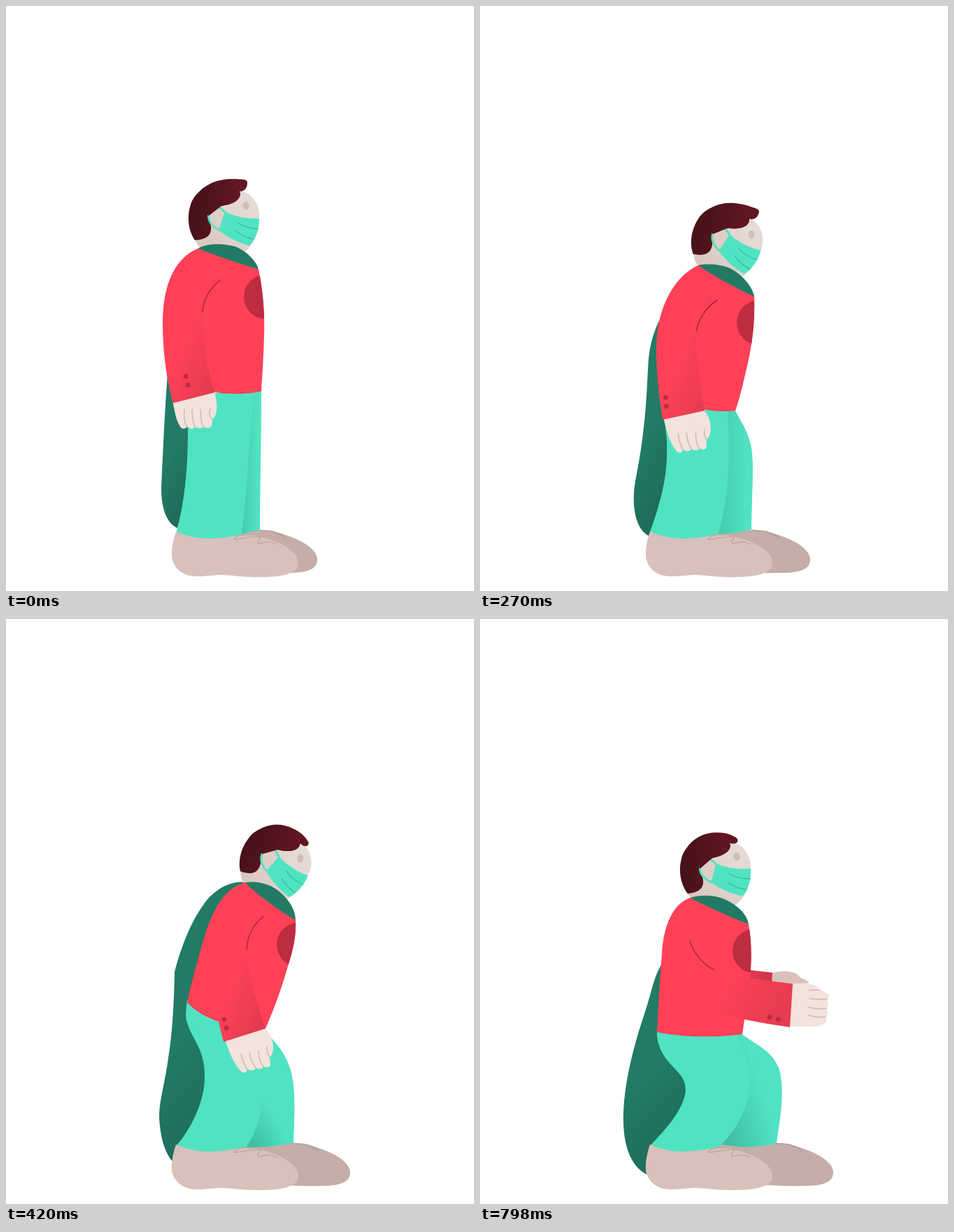
Animation of 669x837 px, one loop 870 ms. Source, as an HTML page without scripts:

```html
<!DOCTYPE html>
<html lang="en">
<head>
<meta charset="utf-8">
<title>Kneeling hero</title>
<style>
  html, body { margin: 0; width: 100%; height: 100%; overflow: hidden; background: #fff; }
  svg { display: block; width: 100%; height: 100%; }

  .cape { fill: url(#capeFill); }
  .collar { fill: #217a64; }
  .hair { fill: url(#hairFill); }
  .leg { fill: #50e3c2; }
  .back-leg { fill: url(#legSide); }
  .back-leg.bent { fill: url(#legBent); }
  .torso { fill: #ff4158; }
  .arm { fill: url(#armDown); }
  .arm.out { fill: url(#armOut); }
  .far-arm { fill: url(#farArm); }
  .badge, .dot { fill: #bd2c41; }
  .hand { fill: #f2e3dc; }
  .far-hand { fill: #d8c1ba; }
  .crease, .fold, .lace { fill: none; stroke-linecap: round; }
  .crease { stroke: #a5283a; stroke-width: 1.5; }
  .fold { stroke: #cfb9b1; stroke-width: 1.5; }
  .lace { stroke: #bfa8a1; stroke-width: 1.5; }

  /* Poses hold, then cut: 120, 150, 150, 150, 120, 180 ms */
  .pose { visibility: hidden; animation: 870ms step-end infinite; }
  #stand { animation-name: stand; }
  #dip { animation-name: dip; }
  #lean { animation-name: lean; }
  #bend { animation-name: bend; }
  #reach { animation-name: reach; }
  #kneel { animation-name: kneel; }
  @keyframes stand { 0% { visibility: visible } 13.793%, 100% { visibility: hidden } }
  @keyframes dip { 0% { visibility: hidden } 13.793% { visibility: visible } 31.034%, 100% { visibility: hidden } }
  @keyframes lean { 0% { visibility: hidden } 31.034% { visibility: visible } 48.276%, 100% { visibility: hidden } }
  @keyframes bend { 0% { visibility: hidden } 48.276% { visibility: visible } 65.517%, 100% { visibility: hidden } }
  @keyframes reach { 0% { visibility: hidden } 65.517% { visibility: visible } 79.31%, 100% { visibility: hidden } }
  @keyframes kneel { 0% { visibility: hidden } 79.31%, 100% { visibility: visible } }
</style>
</head>
<body>
<svg viewBox="0 0 669 837">
  <defs>
    <linearGradient id="capeFill" x1=".3" y1="0" x2=".6" y2="1">
      <stop offset=".5" stop-color="#217b65"/><stop offset="1" stop-color="#1e6a58"/>
    </linearGradient>
    <linearGradient id="hairFill">
      <stop offset=".1" stop-color="#47121a"/><stop offset=".8" stop-color="#611620"/>
    </linearGradient>
    <linearGradient id="skinFill" x1=".2" y1=".9" x2=".8" y2=".3">
      <stop offset="0" stop-color="#d9c7c0"/><stop offset="1" stop-color="#e5dad5"/>
    </linearGradient>
    <linearGradient id="legSide">
      <stop offset="0" stop-color="#44c9ab"/><stop offset=".85" stop-color="#50e3c2"/>
    </linearGradient>
    <linearGradient id="legBent" x1=".1" y1=".8" x2=".75" y2=".45">
      <stop offset="0" stop-color="#40bfa3"/><stop offset=".9" stop-color="#50e3c2"/>
    </linearGradient>
    <linearGradient id="armDown" x1=".4" y1=".55" x2=".85" y2="1">
      <stop offset="0" stop-color="#ff4158"/><stop offset="1" stop-color="#e03a50"/>
    </linearGradient>
    <linearGradient id="armOut" x1=".1" y1=".3" x2=".9" y2=".6">
      <stop offset="0" stop-color="#ff4158"/><stop offset="1" stop-color="#e63c51"/>
    </linearGradient>
    <linearGradient id="farArm">
      <stop offset="0" stop-color="#e33b50"/><stop offset="1" stop-color="#c93449"/>
    </linearGradient>

    <!-- Head parts, with the eye at 0,0 -->
    <g id="face" transform="translate(-343 -286)">
      <path fill="url(#skinFill)" d="M270 334C274 345 283 352 300 362L335 356C352 347 362 325 362 298C361 280 350 267 334 264L290 300Z"/>
      <path class="hair" d="M270 335C258 318 257 288 272 270L320 266H334C337 273 331 283 308 286L290 300L293 316C294 328 287 334 270 335Z"/>
      <path fill="#dfcfc8" stroke="#50e3c2" stroke-width="3" d="M313 295C306 287 301 286 297 288C285 297 287 312 306 321"/>
      <path fill="#dfcfc8" d="M312 295L305 320L300 316Z"/>
      <path fill="#50e3c2" d="M313 294C330 303 350 305 362 304C362 319 357 335 348 343C330 338 312 329 302 318L305 318Z"/>
      <path fill="none" stroke="#30ad91" d="M330 309Q341 318 361 319M328 322Q340 331 354 334"/>
      <ellipse cx="343" cy="286" rx="4.6" ry="6" fill="#d1beb7" transform="rotate(-14 343 286)"/>
    </g>
    <g id="head">
      <use href="#face"/>
      <path class="hair" transform="translate(-343 -286)" d="M264 284C266 278 268 275 272 270C288 251 310 246 334 248C342 248 345 249 345 253C345 261 340 266 334 265C337 273 331 283 308 286L290 300Z"/>
    </g>
    <g id="bowedHead">
      <use href="#face"/>
      <path class="hair" transform="translate(-343 -286)" d="M264 284C266 278 268 275 272 270C284 254 302 249 316 250C329 250 339 255 345 260C348 266 342 269 334 266C337 273 331 283 308 286L290 300Z"/>
    </g>

    <g id="farShoe">
      <path fill="#c4aea7" d="M270 748L345 750C362 749 385 750 400 757C422 764 445 777 445 792C445 806 430 811 405 811C380 812 350 810 330 808Z"/>
      <path class="lace" style="stroke: #b29d96" d="M362 750C375 752 384 750 387 755C392 755 396 757 400 762"/>
    </g>

    <g id="lowHand">
      <path class="hand" d="M259 586C265 605 272 622 280 630C285 636 290 635 291 629C296 632 302 631 303 627C307 630 313 629 314 625C320 628 324 626 324 622L323 612C331 605 330 585 316 570Z"/>
      <path class="fold" d="M282 607C284 618 288 625 291 630M294 605C295 614 299 622 303 627M307 603C307 613 310 620 314 626M319 597C318 605 321 609 323 612"/>
    </g>

    <g id="dots"><circle class="dot" r="3.5"/><circle class="dot" r="3.5" cx="3" cy="12.3"/></g>
    <circle id="badge" class="badge" r="32"/>
  </defs>

  <g id="stand" class="pose">
    <path class="cape" d="M231 525C227 580 224 640 222 690C222 720 230 740 245 747L262 690V600L240 560Z"/>
    <use href="#farShoe"/>
    <path class="back-leg" d="M345 550H365C365 620 363 700 363 749L335 756Z"/>
    <path class="leg" d="M258 556L355 550C347 620 345 690 337 758L292 765L243 755C258 700 260 650 260 600Z"/>
    <use href="#head" transform="translate(343 286)"/>
    <path id="standBody" class="torso" d="M274 347L361 377C368 410 370 445 369 470C368 510 366 530 365 551C345 556 315 556 297 552L260 440Z"/>
    <clipPath id="standClip"><use href="#standBody"/></clipPath>
    <g clip-path="url(#standClip)"><use href="#badge" x="372" y="416"/></g>
    <path class="hand" d="M238 564C241 580 243 592 248 600C251 606 256 606 259 602C264 606 268 606 270 602C274 605 280 605 282 602C288 605 293 604 294 600L295 591C303 585 303 570 298 552Z"/>
    <path class="fold" d="M255 577C254 588 255 597 259 602M266 577C266 588 267 596 270 602M278 577C278 588 279 596 282 602M292 576C290 584 292 589 295 591"/>
    <path class="arm" d="M274 347C240 362 224 400 224 455C224 500 231 540 239 568L298 553C288 520 280 480 281 438C285 420 295 405 307 392Z"/>
    <path class="crease" d="M307 392C293 402 283 418 280.500 438"/>
    <path class="collar" d="M274 347C290 338 315 340 330 345C345 352 358 365 361 377C335 369 300 357 274 347Z"/>
    <use href="#dots" x="257" y="530"/>
  </g>

  <g id="dip" class="pose">
    <path class="cape" d="M239 455C231 480 231 520 231 560C231 600 228 640 222 675C216 705 222 737 245 747L262 690V590L250 500Z"/>
    <use href="#farShoe" x="13"/>
    <path class="back-leg" d="M345 570L366 573C377 592 377 605 376 625C374 680 374 710 374 749L337 756Z"/>
    <path class="leg" d="M258 570H352C354 650 352 700 339 758L292 765L243 755C259 700 260 650 260 588Z"/>
    <use href="#head" transform="translate(358 313) rotate(9.700)"/>
    <path id="dipBody" class="torso" d="M286 365L371 402C376 430 376 455 375 472C372 520 368 555 366 573C350 578 330 577 316 575L270 460Z"/>
    <clipPath id="dipClip"><use href="#dipBody"/></clipPath>
    <g clip-path="url(#dipClip)"><use href="#badge" x="380" y="439"/></g>
    <use href="#lowHand"/>
    <path class="arm" d="M286 365C255 378 238 420 238 465C239 510 248 550 259 589L318 572C305 535 298 500 295 458C295 440 303 425 319 411Z"/>
    <path class="crease" d="M319 411C303 424 295 440 294.500 458"/>
    <path class="collar" d="M286 365C300 358 322 360 335 365C352 372 367 388 371 402C343 392 312 379 286 365Z"/>
    <use href="#dots" x="258.500" y="560"/>
  </g>

  <g id="lean" class="pose">
    <path class="cape" d="M256 450C240 485 241 505 239 540C236 600 230 640 222 680C216 715 222 748 241 758L270 700V600L258 560Z"/>
    <use href="#farShoe" x="27"/>
    <path class="back-leg" d="M345 575L365 579C378 605 390 615 390 660C390 690 388 720 388 749Q360 756 338 756Z"/>
    <path class="leg" d="M262 575H354C357 650 357 700 340 758L292 765L242 755C266 690 268 660 267 620Z"/>
    <use href="#head" transform="translate(388 327) rotate(15.500)"/>
    <path id="leanBody" class="torso" d="M312 371L392 415C393 450 390 480 382 515C375 545 370 565 365 579C350 581 335 580 320 577L290 470Z"/>
    <clipPath id="leanClip"><use href="#leanBody"/></clipPath>
    <g clip-path="url(#leanClip)"><use href="#badge" x="399" y="453"/></g>
    <use href="#lowHand" transform="translate(3 3) rotate(5 260 588)"/>
    <path class="arm" d="M312 371C280 385 252 430 252 490C252 530 257 565 261 592L321 579C314 545 309 505 310 465C312 450 320 433 339 421Z"/>
    <path class="crease" d="M339 421C322 432 312 449 309.500 465"/>
    <path class="collar" d="M312 371C325 368 345 370 357 375C375 384 390 402 392 416C365 403 335 387 312 371Z"/>
    <use href="#dots" transform="translate(265.500 560) rotate(9)"/>
  </g>

  <g id="bend" class="pose">
    <path class="cape" d="M343 377C325 373 300 385 285 405C262 435 247 480 241 505C240 560 237 600 231 635C225 675 216 700 220 725C222 748 230 768 238 776L290 700L300 500Z"/>
    <use href="#farShoe" x="47"/>
    <path class="leg" d="M259 545C257 560 256 570 259 578C268 605 284 615 284 655C284 690 265 730 242 755L292 765L343 757L411 749C411 730 413 710 412 680C410 640 400 620 372 592L340 560Z"/>
    <path class="back-leg bent" d="M365 690C364 720 354 740 343 756Q385 756 411 749C411 730 413 710 412 690Z"/>
    <use href="#bowedHead" transform="translate(421 343) rotate(22)"/>
    <path id="bendBody" class="torso" d="M342 377C310 385 295 420 285 450C270 500 263 530 259 549C270 560 285 570 304 576L371 586C380 565 392 535 402 500C410 475 415 455 414 431Z"/>
    <clipPath id="bendClip"><use href="#bendBody"/></clipPath>
    <g clip-path="url(#bendClip)"><use href="#badge" x="419" y="466"/></g>
    <use href="#lowHand" x="54" y="15"/>
    <path class="arm" d="M320 400L368 426C352 438 345 455 344 473C347 510 358 550 371 586L311 605C305 580 298 555 293 525Z"/>
    <path class="crease" d="M368 426C353 437 345 454 344 473"/>
    <path class="collar" d="M342 377C360 374 380 380 392 391C405 402 414 417 414 431C388 415 362 397 342 377Z"/>
    <use href="#dots" x="312" y="573"/>
  </g>

  <g id="reach" class="pose">
    <path class="cape" d="M357 381C340 380 322 390 308 409C293 429 284 452 272 475C262 490 256 495 250 512C243 528 240 540 238 560C234 600 231 640 223 680C217 705 218 745 238 790L310 680L290 500Z"/>
    <use href="#farShoe" x="60"/>
    <path class="back-leg bent" d="M350 575L390 590L415 632C428 660 430 685 429 700C428 720 425 740 424 750Q395 757 368 755L338 751Z"/>
    <path class="leg" d="M260 560C250 590 250 610 265 627C285 648 302 655 302 677C302 700 275 725 242 755L292 765L343 758C365 735 374 705 374 670C374 640 368 615 360 590Z"/>
    <use href="#bowedHead" transform="translate(439 352) rotate(26.600)"/>
    <path class="far-hand" d="M450 544C470 548 480 560 478 570C484 580 485 588 482 590C478 593 474 591 473 592L474 598L452 584L431 570Z"/>
    <path class="far-arm" d="M409 502L452 544L431 570L395 542Z"/>
    <path id="reachBody" class="torso" d="M355 381C335 383 318 405 305 430C290 460 282 490 275 507L272 520C268 540 262 553 260 562C295 583 330 592 371 596L398 540C404 525 409 515 411 507C418 485 426 465 426 438Z"/>
    <clipPath id="reachClip"><use href="#reachBody"/></clipPath>
    <g clip-path="url(#reachClip)"><use href="#badge" x="430" y="475"/></g>
    <path class="hand" d="M448 585C458 583 468 586 474 594C479 600 480 606 480 610C484 616 488 624 486 627C482 630 478 628 476 628C477 634 478 640 474 642C470 644 466 642 466 643C466 650 464 655 460 655C445 652 430 645 414 631Z"/>
    <path class="fold" d="M459 612Q466 622 476 627M451 626Q461 634 473 642M443 635Q452 644 465 646"/>
    <path class="arm out" d="M366 505C378 522 390 532 400 541L450 584L414 634L370 596L358 545Z"/>
    <path class="crease" d="M359 454C355 475 358 490 366 505"/>
    <path class="collar" d="M355 381C373 380 390 387 402 397C416 407 427 424 426 438C400 420 377 402 355 381Z"/>
    <use href="#dots" transform="translate(396.500 609) rotate(-30)"/>
  </g>

  <g id="kneel" class="pose">
    <path class="cape" d="M259 495C248 513 245 535 236 562C222 603 210 648 206 690C202 735 208 780 239 795L300 680L262 590Z"/>
    <use href="#farShoe" x="60"/>
    <path class="back-leg bent" d="M355 585L375 594C395 610 418 617 428 645C437 680 427 725 424 750Q395 757 368 755L338 751Z"/>
    <path class="leg" d="M253 588C252 617 268 632 280 645C290 655 294 663 294 675C290 705 265 730 242 755L292 765L338 758C365 735 385 700 385 665C386 640 378 615 365 590Z"/>
    <use href="#bowedHead" transform="translate(367 340) rotate(-3.300)"/>
    <path class="far-hand" d="M416 507C430 502 450 503 456 511C460 516 470 516 470 521L447 523L416 519Z"/>
    <path class="far-arm" d="M384 502L418 506L417 521L384 517Z"/>
    <path id="kneelBody" class="torso" d="M300 399C275 408 262 440 260 480C256 525 255 560 253 591C290 599 340 599 375 594L378 573L386 515C388 490 389 465 384 437Z"/>
    <clipPath id="kneelClip"><use href="#kneelBody"/></clipPath>
    <g clip-path="url(#kneelClip)"><use href="#badge" x="393" y="475"/></g>
    <path class="hand" d="M445 522C460 520 480 521 486 530C490 533 499 535 499 539C499 543 496 544 496 545C498 550 498 554 496 557C498 563 498 566 495 569C497 576 494 581 480 583H441Z"/>
    <path class="fold" d="M471 531H486M472 543Q484 545 496 544M469 555Q481 559 495 557M470 567Q482 571 494 569"/>
    <path class="arm out" d="M334 501C350 507 370 512 386 514L447 522L443 584C420 581 400 577 378 573L345 565Z"/>
    <path class="crease" d="M300 461C305 478 320 495 334 501.500"/>
    <path class="collar" d="M300 399C315 394 335 395 347 400C367 408 382 422 384 437C355 425 328 413 300 399Z"/>
    <use href="#dots" transform="translate(414 569.500) rotate(-62)"/>
  </g>

  <!-- Near shoe stays planted -->
  <path fill="#d8c1ba" d="M243 752Q266 762 292 762Q318 761 337 756C372 757 418 774 418 797C418 812 395 817 365 817C345 818 330 815 310 814C295 814 290 816 272 816C255 816 242 807 238 793C235 785 238 766 243 752Z"/>
  <path class="lace" d="M350 757C340 755 329 757 326 763C336 764 352 757 364 760C360 764 358 769 363 769C369 768 373 764 386 770"/>
</svg>
</body>
</html>
```
